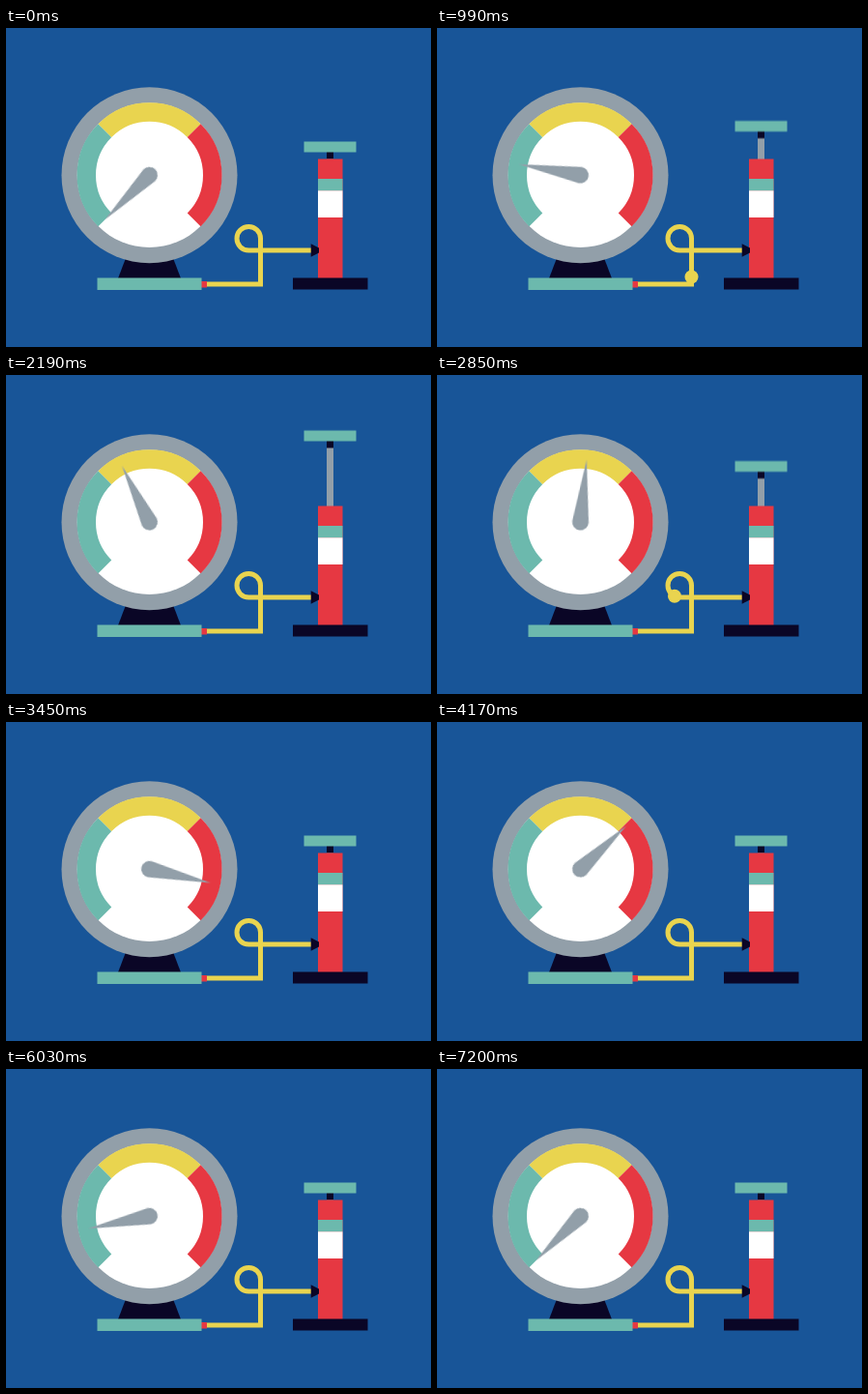
Recreate the animation shown at these times as an HTML page. Size 440 px wide and 330 px high, loop 7410 ms.

```html
<!DOCTYPE html>
<html lang="en">
<head>
<meta charset="utf-8">
<title>Pump and gauge</title>
<style>
  :root {
    --blue: #185598; --grey: #929fa9; --teal: #6cb9ad;
    --yellow: #e9d44f; --red: #e63842; --dark: #0a0626;
    --loop: 7410ms;
    --smooth: cubic-bezier(.37, 0, .63, 1);
  }
  html, body { margin: 0; width: 100%; height: 100%; overflow: hidden; background: var(--blue); }
  svg { display: block; width: 100vw; height: 100vh; }
  .grey { fill: var(--grey); }
  .teal { fill: var(--teal); }
  .red { fill: var(--red); }
  .dark { fill: var(--dark); }
  .white { fill: #fff; }
  .zones path { fill: none; stroke-width: 19.5; }
  .hose { fill: none; stroke: var(--yellow); stroke-width: 5; }

  .needle { animation: needle var(--loop) var(--smooth) infinite; }
  .handle { animation: handle var(--loop) var(--smooth) infinite; }
  .bulge {
    fill: var(--yellow);
    offset-path: path("M330 230H251.25A12.25 12.25 0 1 1 263.5 217.75V265H192");
    offset-rotate: 0deg;
    animation: bulge var(--loop) linear infinite;
  }

  /* three kicks up, then a long leak back to zero */
  @keyframes needle {
    0%, 8.77% { transform: rotate(-135deg); }
    14.17%, 19.16% { transform: rotate(-77deg); }
    26.05%, 36.3% { transform: rotate(-26deg); }
    43.05% { transform: rotate(110deg); animation-timing-function: cubic-bezier(.19, 0, .54, 1); }
    97.98%, 100% { transform: rotate(-135deg); }
  }
  /* two short strokes and a tall one */
  @keyframes handle {
    0%, 10.12%, 10.53%, 20.65%, 24.02%, 41.57%, 100% { transform: translateY(0); }
    5.67%, 16.19% { transform: translateY(-42.5px); }
    33.33% { transform: translateY(-92.5px); }
  }
  /* waits behind the pump, runs to the gauge base, jumps back */
  @keyframes bulge {
    0%, 6.72%, 16.37%, 17.17%, 26.81%, 35.29%, 44.94%, 100% { offset-distance: 0%; }
    16.36%, 26.8%, 44.93% { offset-distance: 100%; }
  }
</style>
</head>
<body>
<svg viewBox="0 0 440 330">
  <path class="hose" d="M318 230H251.25A12.25 12.25 0 1 1 263.5 217.75V265H207"/>
  <circle class="bulge" r="7"/>

  <!-- gauge -->
  <path class="dark" d="M124 238H173L181 259H116Z"/>
  <rect class="red" x="202" y="262" width="6" height="6.5"/>
  <rect class="teal" x="94.5" y="258.5" width="108" height="12.5"/>
  <g transform="translate(148.5 152.2)">
    <circle class="grey" r="91"/>
    <circle class="white" r="74.8"/>
    <g class="zones">
      <path stroke="var(--teal)" d="M-46.14 46.14A65.25 65.25 0 0 1 -46.14 -46.14"/>
      <path stroke="var(--yellow)" d="M-46.14 -46.14A65.25 65.25 0 0 1 46.14 -46.14"/>
      <path stroke="var(--red)" d="M46.14 -46.14A65.25 65.25 0 0 1 46.14 46.14"/>
    </g>
    <path class="needle grey" d="M0 -65L8.43 -1.1A8.5 8.5 0 1 1 -8.43 -1.1Z"/>
  </g>

  <!-- pump -->
  <g class="handle">
    <rect class="grey" x="332" y="135" width="7" height="100"/>
    <rect class="dark" x="332" y="128" width="7" height="7.5"/>
    <rect class="teal" x="308.5" y="117.5" width="54" height="11"/>
  </g>
  <rect class="red" x="323" y="135.5" width="25.5" height="123.5"/>
  <rect class="teal" x="323" y="156" width="25.5" height="12.5"/>
  <rect class="white" x="323" y="168.3" width="25.5" height="27.7"/>
  <rect class="dark" x="297" y="258.5" width="77.5" height="12"/>
  <path class="dark" d="M315.7 223.3L324 227.5V232.5L315.7 236.7Z"/>
</svg>
</body>
</html>
```
